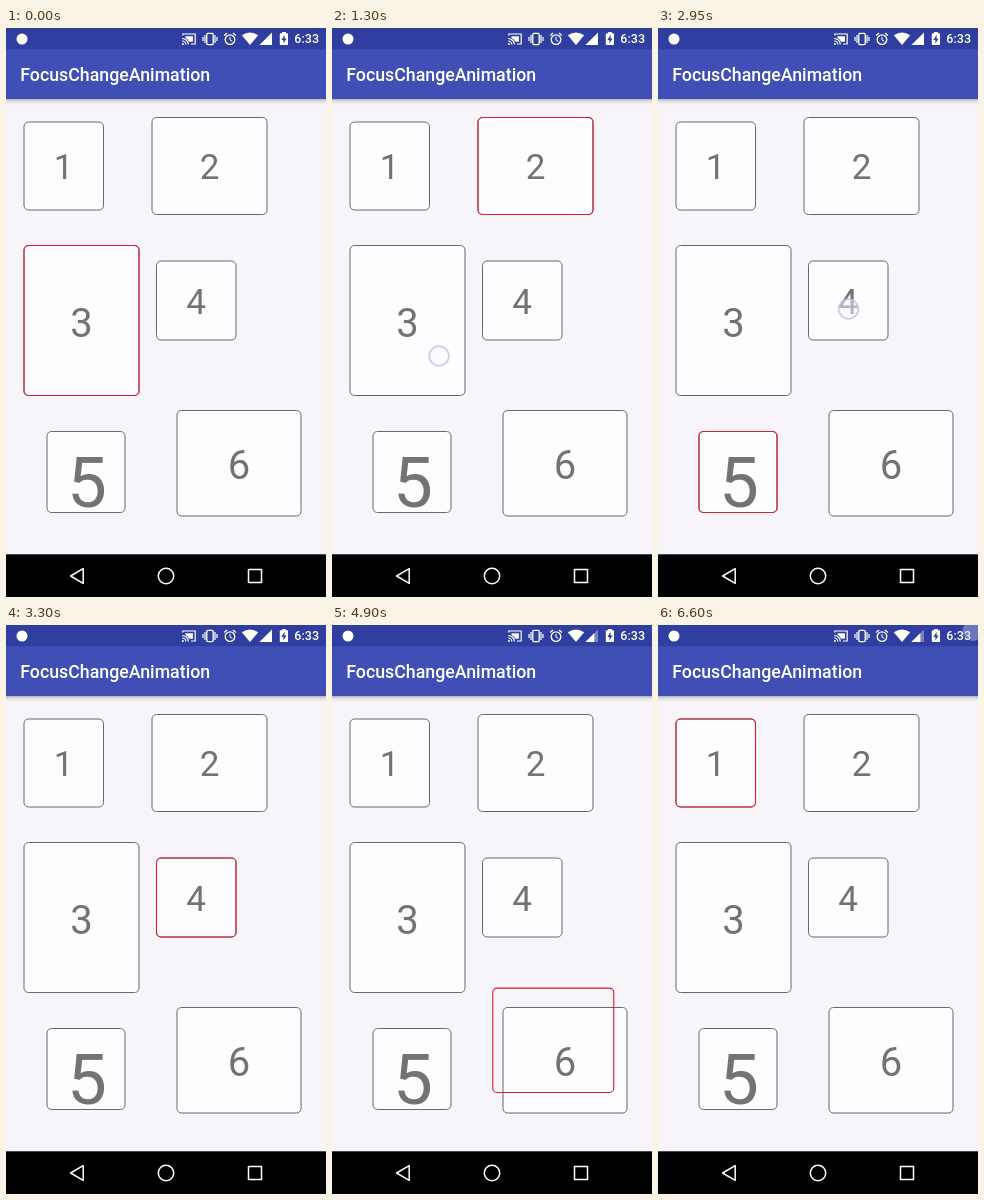
These frames come from a looping animation (320 px wide and 569 px high, 6.65 s). An HTML page with a canvas:

```html
<!DOCTYPE html>
<html lang="en">
<head>
<meta charset="utf-8">
<title>FocusChangeAnimation</title>
<style>
html, body { margin: 0; width: 100%; height: 100%; overflow: hidden; background: #f7f5f9; }
canvas { display: block; width: 320px; height: 569px; }
</style>
</head>
<body>
<canvas id="stage"></canvas>
<script>
const W = 320, H = 569, LOOP = 6650, TICK = 50, MOVE = 300;
const canvas = document.getElementById('stage');
const dpr = window.devicePixelRatio || 1;
canvas.width = W * dpr;
canvas.height = H * dpr;
const c = canvas.getContext('2d');

// left, top, right, bottom, font size, text centre x, baseline
const cards = {
  1: [18, 94, 97.5, 182, 35, 57.5, 151],
  2: [146, 89.5, 261, 186.5, 35, 203.5, 151],
  3: [18, 217.5, 133, 367.5, 40, 75.5, 308.5],
  4: [150.5, 233, 230, 312, 35, 190.2, 286],
  5: [41, 403.5, 119, 484.5, 71, 81, 478.5],
  6: [171, 382.5, 295, 488, 40, 233, 451]
};

// at: finger down, go: focus starts moving
const taps = [
  { at: 50, go: 125, to: 2, x: 205, y: 142 },
  { at: 1300, go: 1350, to: 3, x: 107, y: 328 },
  { at: 2050, go: 2125, to: 5, x: 84, y: 457 },
  { at: 2950, go: 3000, to: 4, x: 190.5, y: 281 },
  { at: 4000, go: 4050, to: 6, x: 234, y: 440 },
  { at: 4800, go: 4850, to: 1, x: 58, y: 142 }
];

const clamp = v => Math.max(0, Math.min(1, v));
const ease = v => 0.5 - Math.cos(Math.PI * v) / 2;

function poly(points, closed = true) {
  c.beginPath();
  points.forEach(([x, y]) => c.lineTo(x, y));
  if (closed) c.closePath();
}

function arc(x, y, r, from = 0, to = Math.PI * 2) {
  c.beginPath();
  c.arc(x, y, r, from, to);
}

function box([l, t, r, b], radius) {
  c.beginPath();
  c.roundRect(l, t, r - l, b - t, radius);
}

function line(x1, y1, x2, y2) {
  poly([[x1, y1], [x2, y2]], false);
  c.stroke();
}

function label(text, x, y, size, weight, color, align) {
  c.font = `${weight} ${size}px Roboto, sans-serif`;
  c.textAlign = align;
  c.fillStyle = color;
  c.fillText(text, x, y);
}

function castIcon() {
  c.lineWidth = 1.2;
  poly([[176.8, 7.6], [176.8, 6], [189.2, 6], [189.2, 16], [185, 16]], false);
  c.stroke();
  c.fillRect(179.5, 8.3, 7.4, 5.4);
  c.fillStyle = '#303f9f';
  arc(176.2, 16.6, 7.4, -Math.PI / 2, 0);
  c.lineTo(176.2, 16.6);
  c.fill();
  c.fillStyle = '#fff';
  for (const r of [3.6, 6.1]) {
    arc(176.2, 16.6, r, -Math.PI / 2, 0);
    c.stroke();
  }
  arc(176.9, 15.9, 1);
  c.fill();
}

function vibrateIcon() {
  c.lineWidth = 1.3;
  box([200.8, 5.4, 207.2, 16.6], 1);
  c.stroke();
  c.lineWidth = 1.2;
  for (const s of [-1, 1]) {
    line(204 + s * 5, 7, 204 + s * 5, 15);
    line(204 + s * 7, 9, 204 + s * 7, 13);
  }
}

function alarmIcon() {
  c.lineWidth = 1.3;
  arc(224, 11.6, 4.8);
  c.stroke();
  line(218.2, 7.4, 221, 5);
  line(229.8, 7.4, 227, 5);
  c.lineWidth = 1;
  poly([[224, 8.8], [224, 12], [226.3, 13.4]], false);
  c.stroke();
}

function signalIcons(weak) {
  poly([[244, 17]]);
  c.beginPath();
  c.moveTo(244, 17);
  c.lineTo(235.8, 7.2);
  c.quadraticCurveTo(244, 1.6, 252.2, 7.2);
  c.closePath();
  c.fill();

  const full = [[253.4, 17], [266, 4.4], [266, 17]];
  if (weak) {
    c.globalAlpha = 0.35;
    poly(full);
    c.fill();
    c.globalAlpha = 1;
    poly([[253.4, 17], [262.4, 8], [262.4, 17]]);
    c.fill();
  } else {
    poly(full);
    c.fill();
  }
}

function batteryIcon() {
  c.fillRect(276.2, 4, 3.6, 2);
  box([273.8, 5.2, 282, 17], 0.8);
  c.fill();
  c.fillStyle = '#303f9f';
  poly([[278.6, 6.8], [275.4, 12], [277.4, 12], [277.4, 15.6], [280.6, 10.4], [278.6, 10.4]]);
  c.fill();
}

function bars(t) {
  c.fillStyle = '#3f4fb5';
  c.fillRect(0, 21, W, 50);
  c.fillStyle = '#303f9f';
  c.fillRect(0, 0, W, 21.3);
  const shade = c.createLinearGradient(0, 71, 0, 77);
  shade.addColorStop(0, 'rgba(0,0,0,.27)');
  shade.addColorStop(0.4, 'rgba(0,0,0,.1)');
  shade.addColorStop(1, 'rgba(0,0,0,0)');
  c.fillStyle = shade;
  c.fillRect(0, 71, W, 6);
  label('FocusChangeAnimation', 14.2, 53, 17.78, 500, '#fff', 'left');

  c.fillStyle = c.strokeStyle = '#fff';
  arc(16, 11, 5.5);
  c.fill();
  castIcon();
  vibrateIcon();
  alarmIcon();
  signalIcons(t >= 4500);
  batteryIcon();
  label('6:33', 313, 15.4, 12.5, 500, '#fff', 'right');

  c.fillStyle = '#000';
  c.fillRect(0, 526.3, W, H - 526.3);
  c.strokeStyle = '#fff';
  c.lineWidth = 1.5;
  c.lineJoin = 'round';
  poly([[64.6, 548], [77.2, 540.6], [77.2, 555.4]]);
  c.stroke();
  arc(160, 548, 7.7);
  c.stroke();
  c.strokeRect(242.5, 541.5, 13, 13);
  c.lineJoin = 'miter';
}

function card(n) {
  const [, , , , size, x, y] = cards[n];
  box(cards[n], 4.5);
  c.fillStyle = '#fdfcfe';
  c.fill();
  c.strokeStyle = '#68676a';
  c.lineWidth = 1;
  c.stroke();
  label(n, x, y, size, 400, '#737275', 'center');
}

function focusAt(t) {
  let edges = cards[3].slice(0, 4);
  for (const { go, to } of taps) {
    const p = ease(clamp((t - go) / MOVE));
    edges = edges.map((e, i) => e + (cards[to][i] - e) * p);
  }
  return edges;
}

function touch(x, y) {
  arc(x, y, 9.8);
  c.fillStyle = 'rgba(250,250,255,.5)';
  c.fill();
  c.strokeStyle = 'rgba(190,188,228,.75)';
  c.lineWidth = 1.8;
  c.stroke();
}

function draw(t) {
  c.setTransform(dpr, 0, 0, dpr, 0, 0);
  c.fillStyle = '#f7f5f9';
  c.fillRect(0, 0, W, H);
  for (const n in cards) card(n);
  box(focusAt(t), 4.5);
  c.strokeStyle = '#dc1c28';
  c.lineWidth = 1.1;
  c.stroke();
  bars(t);
  for (const { at, go, x, y } of taps) if (t >= at && t < go) touch(x, y);
  if (t >= 6600) {
    arc(314.5, 6, 10);
    c.fillStyle = 'rgba(200,204,240,.4)';
    c.fill();
  }
}

const start = performance.now();
function frame() {
  const t = (performance.now() - start) % LOOP;
  draw(Math.floor(t / TICK) * TICK);
  requestAnimationFrame(frame);
}
frame();
</script>
</body>
</html>
```
